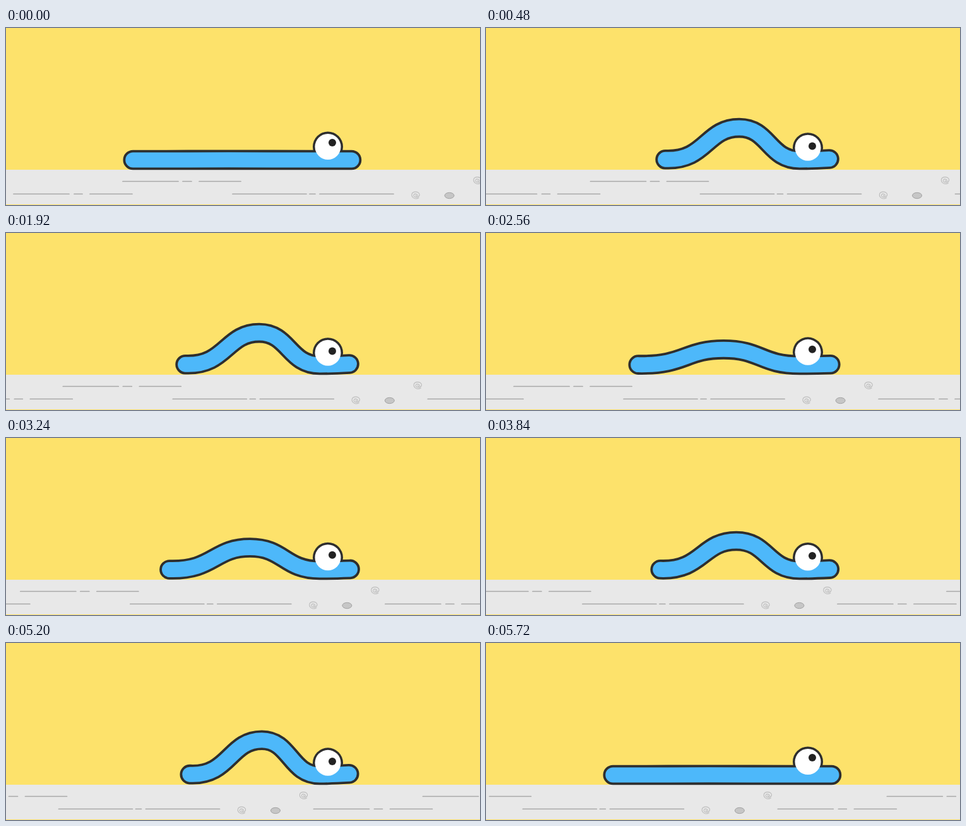
Write an HTML page that moves like this. It is 751 px wide and 281 px high and loops after 5760 ms.

```html
<!DOCTYPE html>
<html lang="en">
<head>
<meta charset="utf-8">
<title>Inchworm</title>
<style>
  html, body { margin: 0; width: 100%; height: 100%; overflow: hidden; background: #fde26b; }
  svg { display: block; width: 751px; height: 281px; }
  path { fill: none; stroke-linecap: round; }
  .dash { stroke: #a8a8a8; stroke-width: 1.7; }
  .swirl { stroke: #bdbdbd; stroke-width: 1.1; }
</style>
</head>
<body>
<svg viewBox="0 0 751 281">
  <defs>
    <path id="swirl" class="swirl" d="M5 4C-1 8-7 3-6-2C-4-7 4-6 6-2C7 3-1 5-3 1C-4-3 2-3 3 0C2 2 0 2 0 0"/>
    <g id="tile">
      <path class="dash" d="M185 243.5H273M280 243.5H294M306 243.5H372
        M12 263.5H100M108 263.5H121M133 263.5H200M359 263.5H476M481 263.5H490M497 263.5H614"/>
      <use href="#swirl" x="649" y="265.5"/>
      <use href="#swirl" x="747" y="242"/>
      <ellipse cx="702.5" cy="266" rx="7.5" ry="4.7" fill="#c6c6c6" stroke="#a2a2a2"/>
    </g>
  </defs>
  <rect y="225" width="751" height="55" fill="#e8e8e8"/>
  <g id="ground">
    <use href="#tile"/>
    <use href="#tile" x="751"/>
  </g>
  <path id="outline" stroke="#2e2e2e" stroke-width="31.6"/>
  <circle id="ring" cx="510" r="24" fill="#2e2e2e"/>
  <path id="body" stroke="#4db8fa" stroke-width="24"/>
  <circle id="white" cx="510" r="20.5" fill="#fff"/>
  <circle id="pupil" cx="517" r="6" fill="#222"/>
</svg>
<script>
const LOOP = 5760, CYCLE = 1440, STEP = 40, STRIDE = 75.2;
const el = id => document.getElementById(id);
const smooth = p => p * p * (3 - 2 * p);

// k runs from 0 (stretched flat) to 1 (fully arched)
function spine(k) {
  const tail = 201 + 107 * k, top = 353 + 62 * k, y = 209.5 - 65.5 * k;
  const left = tail + (top - tail) * 0.55, right = top + (497 - top) * 0.49;
  return `M${tail} ${209.5 - k}C${left} ${209.5 + 2.5 * k} ${left} ${y} ${top} ${y}` +
    `C${right} ${y} ${right} 209.5 497 209.5` +
    `C513 209.5 530 ${209.5 - k} ${547.5 - 4.5 * k} ${209.5 - 2 * k}`;
}

function draw(now) {
  const t = Math.floor(now % LOOP / STEP) * STEP;
  const phase = t % CYCLE / CYCLE;
  const shift = STRIDE * (Math.floor(t / CYCLE) + smooth(phase));
  el("ground").setAttribute("transform", `translate(${-shift})`);

  const swing = (t % CYCLE + STEP / 2) / CYCLE;
  const k = smooth(1 - Math.abs(1 - 2 * swing));
  for (const id of ["outline", "body"]) el(id).setAttribute("d", spine(k));
  for (const id of ["ring", "white"]) el(id).setAttribute("cy", 188.5 + 2.2 * k);
  el("pupil").setAttribute("cy", 182 + 7 * k);
}

function frame() {
  draw(performance.now());
  requestAnimationFrame(frame);
}
frame();
</script>
</body>
</html>
```
